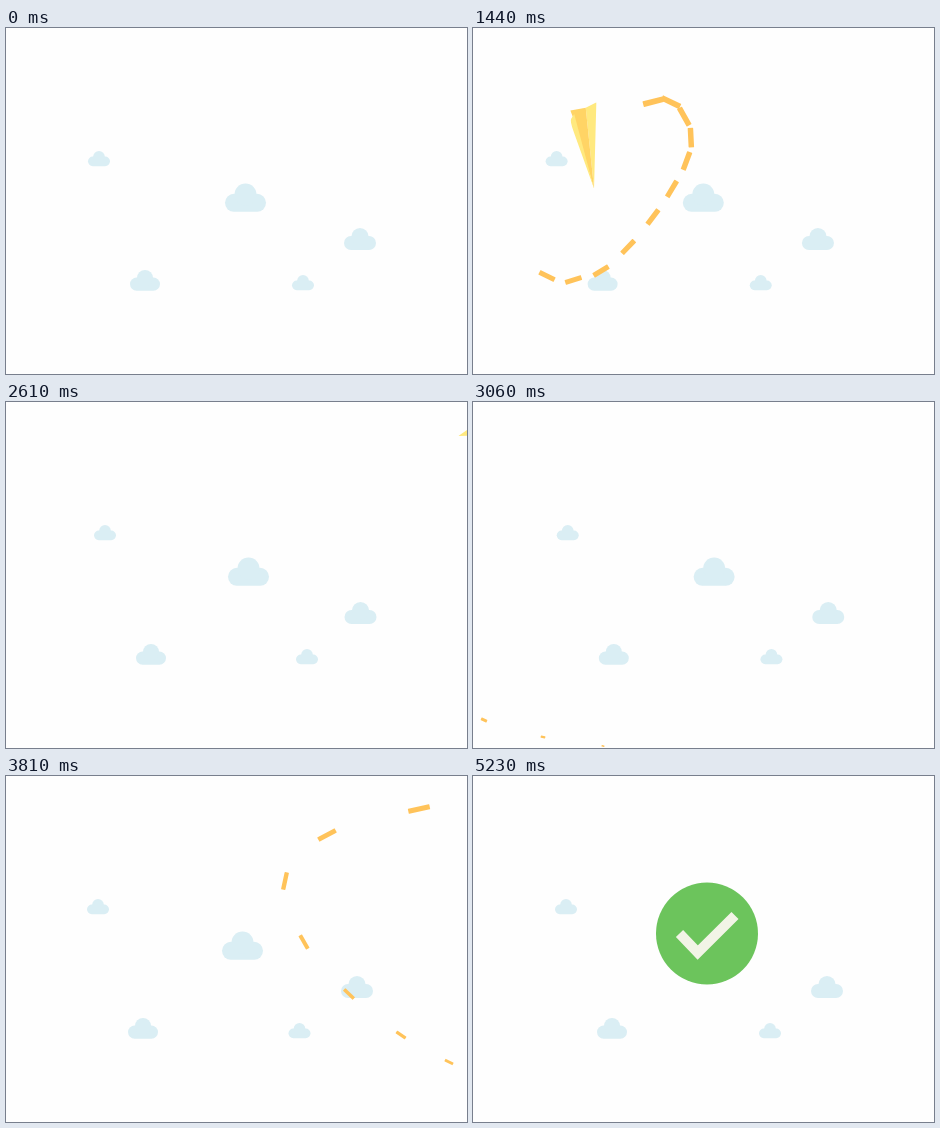
Animation, 461 px wide and 346 px high, one loop 6160 ms. Source, as an HTML page with a canvas:

```html
<!DOCTYPE html>
<html lang="en">
<head>
<meta charset="utf-8">
<title>Paper plane</title>
<style>
  html, body { margin: 0; width: 100%; height: 100%; overflow: hidden; background: #fefefe; }
  canvas { display: block; width: 461px; height: 346px; }
</style>
</head>
<body>
<canvas id="stage" width="461" height="346"></canvas>
<script>
const ctx = document.getElementById('stage').getContext('2d');
const LOOP = 6160;
const SKY = '#daeef4', LIGHT = '#ffe97f', FOLD = '#ffd465', DASH = '#ffc35a';

const clamp = v => Math.max(0, Math.min(1, v));
const mix = (a, b, k) => a + (b - a) * k;
const mixAll = (a, b, k) => a.map((v, i) => mix(v, b[i], k));

// Rows are [time, ...values]
function segment(rows, t) {
  let i = 0;
  while (i < rows.length - 2 && t >= rows[i + 1][0]) i++;
  return [i, clamp((t - rows[i][0]) / (rows[i + 1][0] - rows[i][0]))];
}

function linear(rows, t) {
  const [i, k] = segment(rows, t);
  return mixAll(rows[i], rows[i + 1], k).slice(1);
}

function smooth(rows, t) {
  const [i, k] = segment(rows, t);
  const a = rows[i], b = rows[i + 1], span = b[0] - a[0], k2 = k * k, k3 = k2 * k;
  const slope = (j, c) => {
    const p = rows[Math.max(j - 1, 0)], n = rows[Math.min(j + 1, rows.length - 1)];
    return (n[c] - p[c]) / (n[0] - p[0]);
  };
  return a.slice(1).map((v, n) => {
    const c = n + 1;
    return mix(v, b[c], 3 * k2 - 2 * k3)
      + span * ((k3 - 2 * k2 + k) * slope(i, c) + (k3 - k2) * slope(i + 1, c));
  });
}

function headingAt(path, t) {
  const [x0, y0] = smooth(path, t - 1), [x1, y1] = smooth(path, t + 1);
  return Math.atan2(y1 - y0, x1 - x0);
}

// Clouds: x, y, width, the three drifts that differ
const clouds = [
  [82, 123, 22, 6, -2, -1],
  [219, 155.5, 41, 3, -0.5, -3],
  [338, 200, 32, 0.5, 0.5, -3],
  [124, 242, 30, 6, -2, -2],
  [286, 247, 22, 4, -1.5, -3.5]
];

function drawCloud([x, y, w, d1, d2, d3], t) {
  const drift = [[0, 0], [1050, -8], [1950, -8], [2610, d1], [3360, d2], [3810, d3], [4500, 0]];
  ctx.save();
  ctx.translate(x + smooth(drift, t)[0], y);
  ctx.scale(w / 41, w / 41);
  ctx.fillStyle = SKY;
  ctx.beginPath();
  ctx.roundRect(0, 10.3, 41, 18, 9);
  ctx.fill();
  ctx.beginPath();
  ctx.arc(20.5, 11, 11, 0, 7);
  ctx.fill();
  ctx.restore();
}

// Flights: time, nose x, nose y
const rise = [
  [30, 470, 134], [630, 84, 115], [690, 42, 118], [750, 27, 165], [820, 38, 220], [890, 80, 250],
  [960, 128, 243], [1050, 185, 182], [1150, 218, 115], [1260, 190, 72], [1380, 125, 115],
  [1500, 135, 205], [1620, 215, 255], [1740, 300, 205], [1830, 345, 145], [1950, 380, 107],
  [2610, 567, -44], [2670, 584, -58]
];
const sweep = [
  [2680, 180, 365], [2820, 70, 335], [2900, 5, 315], [2980, -60, 265], [3060, -40, 190],
  [3130, 35, 128], [3200, 140, 85], [3280, 265, 100], [3360, 382, 163], [3440, 500, 232], [3520, 640, 310]
];
const awayDashes = [[500, 20], [413, 33], [321, 59], [279, 105], [298, 166], [343, 218], [395, 259], [443, 286], [492, 308]];
const away = awayDashes.map((pt, i) => [3530 + 35 * i, ...pt]);

// Plane growth: time, length, pose
const growth = [
  [30, 8, 0], [630, 16, 0], [1050, 57, 0], [1300, 70, 0.1], [1830, 115, 1], [2670, 115, 1],
  [2680, 20, 1], [3360, 156, 2], [3520, 160, 2], [3530, 60, 1], [3810, 14, 0]
];

// Poses: left tip, left fold, keel, right seam, right tip, made relative to nose and heading
function makePose(path, t, points) {
  const [nx, ny] = smooth(path, t), [len] = linear(growth, t), h = headingAt(path, t);
  const c = Math.cos(h) / len, s = Math.sin(h) / len;
  return points.map(([x, y]) => [(x - nx) * c + (y - ny) * s, (y - ny) * c - (x - nx) * s]);
}
const keel = [159.5, 231];
const poses = [
  makePose(rise, 1050, [[146, 221], [152, 226], keel, keel, keel]),
  makePose(rise, 1950, [[267, 188], [292, 187], [313, 207], [316, 186], [350, 185]]),
  makePose(sweep, 3360, [[212, 140], [235, 100], [244, 83], [254, 67], [275, 26]])
];

function drawPlane(path, t) {
  if (t < path[0][0] || t > path[path.length - 1][0]) return;
  const [x, y] = smooth(path, t), [len, pose] = linear(growth, t);
  const from = Math.min(1, Math.floor(pose));
  const [left, fold, keel, seam, right] =
    poses[from].map((pt, i) => mixAll(pt, poses[from + 1][i], pose - from));
  const wing = (inner, tip, round) => {
    ctx.beginPath();
    ctx.moveTo(0, 0);
    ctx.lineTo(...inner);
    ctx.lineTo(...mixAll(tip, inner, round * 2));
    ctx.quadraticCurveTo(...tip, ...mixAll(tip, [0, 0], round));
    ctx.fillStyle = LIGHT;
    ctx.fill();
  };
  ctx.save();
  ctx.translate(x, y);
  ctx.rotate(headingAt(path, t));
  ctx.scale(len, len);
  wing(fold, left, 0.01 + 0.06 * clamp(pose - 1));
  ctx.beginPath();
  ctx.moveTo(0, 0);
  for (const pt of [fold, keel, mixAll(seam, right, 0.35)]) ctx.lineTo(...pt);
  ctx.fillStyle = FOLD;
  ctx.fill();
  wing(seam, right, mix(0.16, 0.08, clamp(pose - 1)));
  ctx.restore();
}

// Dashed trails: centres, then first and last birth, death and size
const trail = (at, born, dies, size) => ({ at, born, dies, size });
const row = (n, f) => Array.from({ length: n }, (_, i) => f(i));
const trails = [
  trail(row(31, i => [455 - 13 * i, 133 - 0.65 * i]), [80, 690], [660, 1045], [[2, 1], [2, 1]]),
  trail([[49, 113], [40, 121], [33, 131], [29, 147], [27, 169], [30, 193], [37, 217], [52, 237], [74, 248]],
    [720, 1040], [1070, 1480], [[2, 1], [17, 5]]),
  trail(row(13, i => smooth(rise, 920 + 40 * i)), [1080, 1560], [1500, 1890], [[17, 5], [22, 6]]),
  trail([[130, 344], [70, 335], [11, 318], [-40, 285]], [2850, 2990], [3340, 3500], [[3, 1.5], [8, 3.5]]),
  trail([[-18, 185], [13, 145], [55, 114], [104, 94], [158, 86], [215, 87], [270, 105], [322, 132]],
    [3140, 3490], [3480, 3780], [[15, 7.7], [68, 17]]),
  trail(awayDashes, [3580, 3800], [3830, 4390], [[24, 5.6], [7, 2.4]])
];

function drawTrail({ at, born, dies, size }, t) {
  const last = at.length - 1;
  ctx.fillStyle = DASH;
  at.forEach(([x, y], i) => {
    const k = i / last;
    if (t < mix(...born, k) || t >= mix(...dies, k)) return;
    const a = at[Math.max(i - 1, 0)], b = at[Math.min(i + 1, last)];
    const [w, h] = mixAll(...size, k);
    ctx.save();
    ctx.translate(x, y);
    ctx.rotate(Math.atan2(b[1] - a[1], b[0] - a[0]));
    ctx.beginPath();
    ctx.roundRect(-w / 2, -h / 2, w, h, h > 7 ? 2.5 : 0.5);
    ctx.fill();
    ctx.restore();
  });
}

function drawCheck(t) {
  const alpha = clamp((t - 4600) / 630);
  if (!alpha) return;
  ctx.save();
  ctx.globalAlpha = alpha;
  ctx.beginPath();
  ctx.arc(234, 157.5, 51, 0, 7);
  ctx.fillStyle = '#6cc45c';
  ctx.fill();
  ctx.beginPath();
  ctx.moveTo(206.5, 157.5);
  ctx.lineTo(224.7, 176.5);
  ctx.lineTo(262, 139.5);
  ctx.strokeStyle = '#f2f4e6';
  ctx.lineWidth = 10;
  ctx.stroke();
  ctx.restore();
}

function draw(t) {
  ctx.fillStyle = '#fefefe';
  ctx.fillRect(0, 0, 461, 346);
  clouds.forEach(c => drawCloud(c, t));
  trails.forEach(tr => drawTrail(tr, t));
  [rise, sweep, away].forEach(path => drawPlane(path, t));
  drawCheck(t);
}

const start = performance.now();
function tick() {
  draw((performance.now() - start) % LOOP);
  requestAnimationFrame(tick);
}
tick();
</script>
</body>
</html>
```
